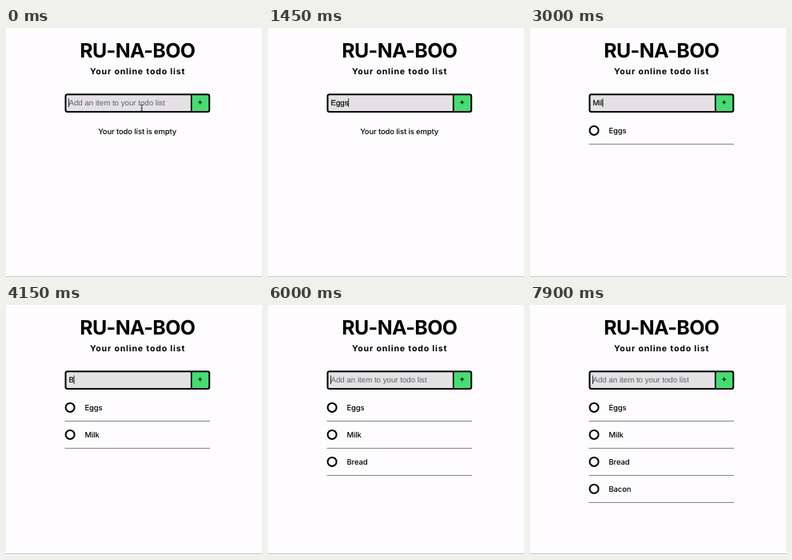
Write an HTML page that moves like this. It is 320 by 312 pixels and loops after 8 s.

```html
<!DOCTYPE html>
<html lang="en">
<head>
<meta charset="utf-8">
<title>Todo list</title>
<style>
  html, body { margin: 0; height: 100%; overflow: hidden; background: #fefcff; }
  svg { display: block; width: 100vw; height: 100vh; }
  text {
    font: 450 9.45px Inter, "Noto Sans", sans-serif;
    letter-spacing: -.1px;
    font-optical-sizing: none;
    text-rendering: geometricPrecision;
  }
  .mid { text-anchor: middle; }
  .title { font-size: 24.8px; font-weight: 700; letter-spacing: -.5px; }
  .sub { font-size: 10.5px; font-weight: 700; letter-spacing: .85px; }
  .plus { font-size: 10px; font-weight: 600; }
  .field { font: 9.7px "Liberation Sans", Arial, sans-serif; letter-spacing: 0; }
</style>
</head>
<body>
<svg viewBox="0 0 320 312">
  <text class="mid title" x="164.3" y="36.5">RU-NA-BOO</text>
  <text class="mid sub" x="164.5" y="58.2">Your online todo list</text>

  <rect x="74.5" y="83.2" width="179.7" height="21.7" rx="2.2" fill="#e3e1e4"/>
  <path d="M231.7 83.2H254V104.9H231.7Z" fill="#46dc73"/>
  <path d="M231.7 83.2V104.9" stroke="#000" stroke-width="1.7"/>
  <rect x="74.5" y="83.2" width="179.7" height="21.7" rx="2.2" fill="none" stroke="#000" stroke-width="2"/>
  <text class="mid plus" x="242.6" y="96.2">+</text>

  <text class="field" id="hint" x="78.5" y="96.9" fill="#626165">Add an item to your todo list</text>
  <text class="field" id="typed" x="78.5" y="96.9" stroke="#000" stroke-width=".15"></text>
  <rect id="caret" y="88.3" width=".8" height="10.7"/>
  <path id="pointer" d="M168 96.3Q169.7 96.3 169.7 97.5Q169.7 96.3 171.4 96.3M169.7 97.5V103M168.7 100.6H170.7M168 104.2Q169.7 104.2 169.7 103Q169.7 104.2 171.4 104.2" fill="none" stroke="#222" stroke-width=".8"/>

  <text class="mid" id="empty" x="164.2" y="133">Your todo list is empty</text>
  <g id="list"></g>
  <path d="M0 311.5H320" stroke="#c9c8ca"/>
</svg>
<script>
const LOOP = 8000, BLINK = 500;

// Input value over time; every entry restarts the caret blink.
const edits = [
  [-100, ""], [900, "E"], [1250, "Eg"], [1350, "Egg"], [1450, "Eggs"],
  [1950, ""], [2300, "M"], [2500, "Mi"], [3000, "Mil"], [3050, "Milk"],
  [3550, ""], [3650, ""], [4150, "B"], [4400, "Br"], [4500, "Bre"], [4850, "Brea"], [5500, "Bread"],
  [6000, ""], [6750, "B"], [7050, "Ba"], [7250, "Bac"], [7350, "Baco"], [7600, "Bacon"],
  [7900, ""]
];
const items = [["Eggs", 1950], ["Milk", 3550], ["Bread", 6000], ["Bacon", 7900]];

const el = id => document.getElementById(id);
const [hint, typed, caret, pointer, empty, list] =
  ["hint", "typed", "caret", "pointer", "empty", "list"].map(el);
const show = (node, on) => node.setAttribute("visibility", on ? "visible" : "hidden");

list.innerHTML = items.map(([name], i) => `
  <g transform="translate(0 ${34 * i})">
    <circle cx="80.1" cy="128.4" r="5.5" fill="none" stroke="#000" stroke-width="2"/>
    <text x="98.5" y="132.4">${name}</text>
    <path d="M73.5 145.5H255" stroke="#77767a" stroke-width=".9"/>
  </g>`).join("");

function draw(now) {
  const t = now % LOOP;
  const [since, value] = edits.filter(e => e[0] <= t).pop();
  if (typed.textContent !== value) typed.textContent = value;
  const width = value ? typed.getComputedTextLength() : 0;
  caret.setAttribute("x", 78.2 + width);
  show(caret, Math.floor((t - since) / BLINK) % 2 === 0);
  show(hint, !value);
  show(pointer, t < 900);
  show(empty, t < items[0][1]);
  items.forEach((item, i) => show(list.children[i], t >= item[1]));
  requestAnimationFrame(draw);
}
draw(0);
</script>
</body>
</html>
```
